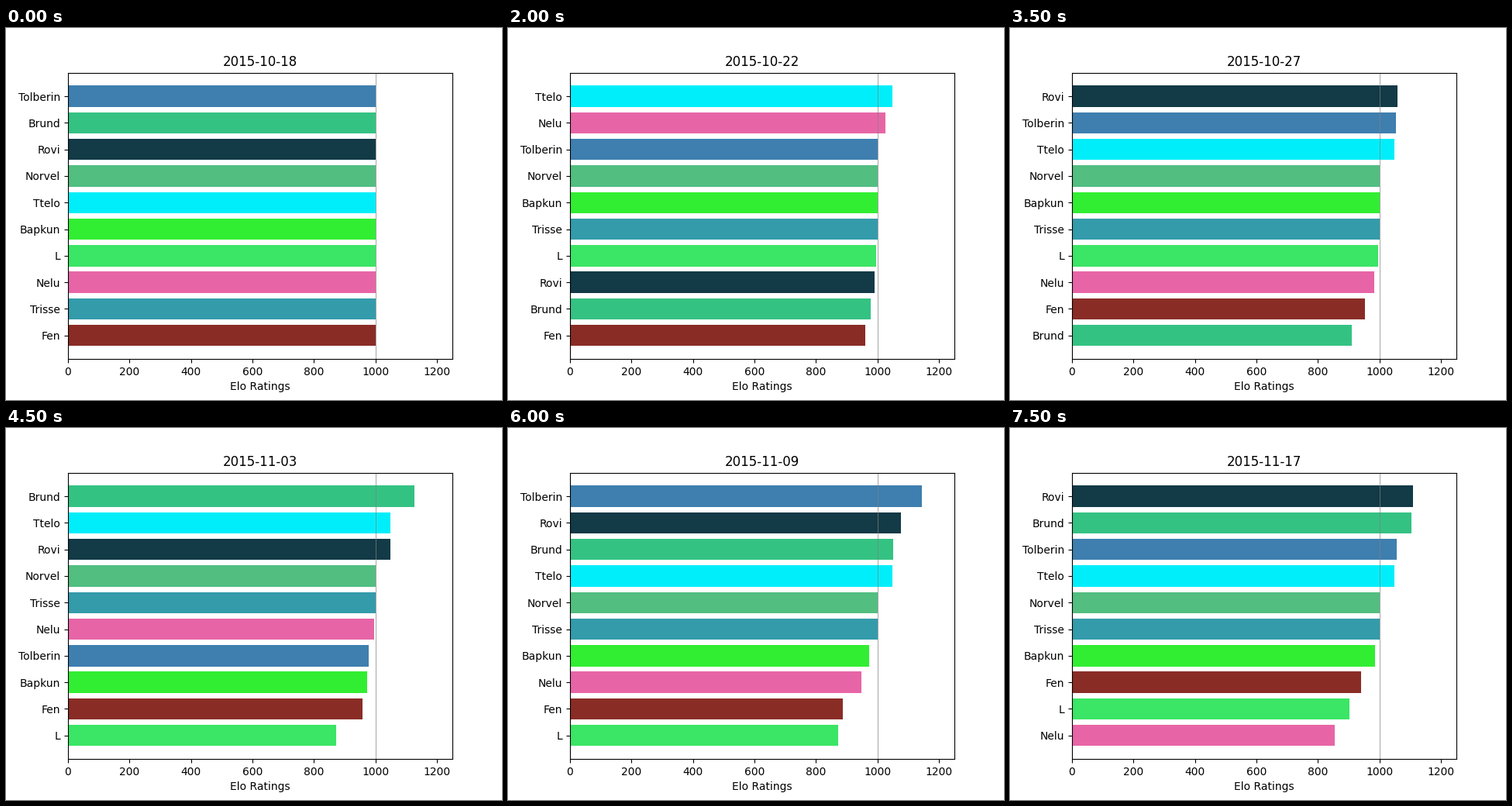
Animation, 640 px wide and 480 px high, one loop 8000 ms. Source, as a matplotlib script:

```python
import matplotlib.pyplot as plt
from matplotlib.animation import FuncAnimation

BASE = 1000
COLORS = {
    "Tolberin": "#3e7faf",
    "Brund": "#34c283",
    "Rovi": "#133a47",
    "Norvel": "#52be80",
    "Ttelo": "#00eefa",
    "Bapkun": "#31ee33",
    "L": "#3be565",
    "Nelu": "#e765a6",
    "Trisse": "#339baa",
    "Fen": "#8a2c26",
}

# Ratings that changed on each match day; the others carry over.
MATCH_DAYS = [
    ("10-18", {}),
    ("10-19", dict(Nelu=1033, Fen=1014, L=985, Brund=968)),
    ("10-20", dict(Nelu=1081, Fen=1028, Rovi=998.4, Tolberin=997.6, L=973, Brund=920)),
    ("10-21", dict(Nelu=1086, Tolberin=1000.5, Fen=990, Rovi=989, L=985, Brund=950)),
    ("10-22", dict(Ttelo=1048, Nelu=1026, Tolberin=1001.5, L=995, Rovi=990,
                   Brund=978, Fen=960)),
    ("10-23", dict(Rovi=1069, Tolberin=1020, Nelu=985, Brund=950, Fen=933)),
    ("10-26", dict(Rovi=1063, Tolberin=1030, Fen=950, Brund=929)),
    ("10-27", dict(Rovi=1058, Tolberin=1053, Nelu=983, Fen=953, Brund=910)),
    ("11-02", dict(Brund=1094, Rovi=1049, Tolberin=1010, Nelu=990, Bapkun=972,
                   Fen=965, L=872)),
    ("11-03", dict(Brund=1127, Rovi=1047.5, Nelu=995, Tolberin=978, Fen=958)),
    ("11-04", dict(Brund=1095, Rovi=1060, Tolberin=1035, Nelu=985, Fen=933)),
    ("11-06", dict(Brund=1114, Rovi=1070, Tolberin=1060, Nelu=948, Fen=916)),
    ("11-09", dict(Tolberin=1144, Rovi=1076, Brund=1051, Fen=888)),
    ("11-11", dict(Tolberin=1094, Rovi=1085, Brund=1062, Nelu=975, Fen=892)),
    ("11-13", dict(Rovi=1090, Tolberin=1075, Brund=1070, Bapkun=985, Fen=925,
                   Nelu=920, L=887)),
    ("11-17", dict(Rovi=1109, Brund=1104, Tolberin=1056, Fen=940, L=902, Nelu=855)),
]

fig, ax = plt.subplots(figsize=(6.4, 4.8), dpi=100)
rows = range(len(COLORS))
bars = ax.barh(rows, [BASE] * len(COLORS))
ax.axvline(BASE, color="gray", linewidth=0.5)
ax.set_xlim(0, 1250)
ax.set_yticks(rows)
ax.invert_yaxis()
ax.set_xlabel("Elo Ratings")


def standings(day):
    ratings = dict.fromkeys(COLORS, BASE)
    for _, changes in MATCH_DAYS[:day + 1]:
        ratings.update(changes)
    return sorted(ratings.items(), key=lambda item: -item[1])


def update(day):
    table = standings(day)
    for bar, (name, rating) in zip(bars, table):
        bar.set_width(rating)
        bar.set_color(COLORS[name])
        bar.set_linewidth(0)
    ax.set_yticklabels([name for name, _ in table])
    ax.set_title(f"2015-{MATCH_DAYS[day][0]}")


anim = FuncAnimation(fig, update, frames=len(MATCH_DAYS), interval=500,
                     init_func=lambda: update(0), repeat=True, repeat_delay=0)
plt.show()
```
